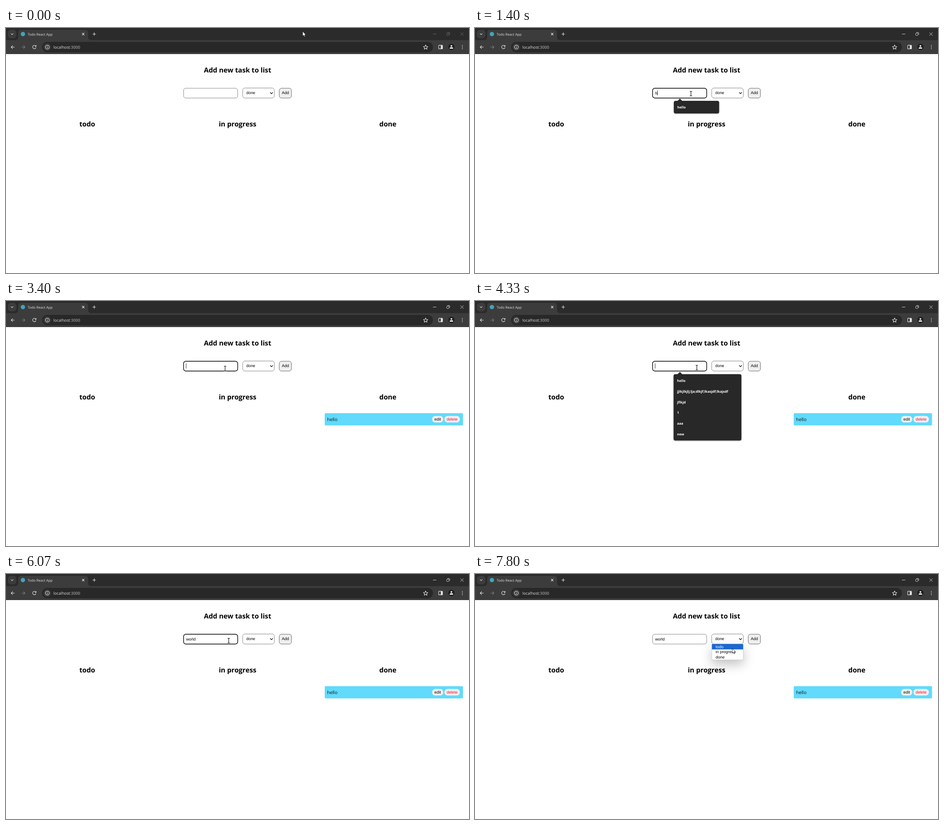
These frames come from a looping animation (1027 by 545 pixels, 8 s). An HTML page:

```html
<!DOCTYPE html>
<html lang="en">
<head>
<meta charset="utf-8">
<title>Todo React App</title>
<style>
  html, body { margin: 0; width: 100%; height: 100%; overflow: hidden; background: #fff; }
  svg { display: block; width: 100%; height: 100%; text-rendering: geometricPrecision; }
  .ui { font-family: "Open Sans", "Noto Sans", sans-serif; }
  .head { font-size: 15.2px; font-weight: 700; text-anchor: middle; }
  .form { font: 8.91px "Liberation Sans", Arial, sans-serif; }
  .mid { text-anchor: middle; }
  .icon { fill: none; stroke: #e3e3e3; stroke-width: 1.1; }
  .field { fill: #fff; stroke: #767676; stroke-width: .9; }
  .field.focus { stroke: #000; stroke-width: 1.4; }
  .winctl { fill: none; stroke: #757575; stroke-width: .8; }
  .winctl.focus { stroke: #f2f2f2; }
  .popup { filter: drop-shadow(0 1px 1.2px rgba(0, 0, 0, .4)); }
  .popup path { fill: #282828; }
  .popup text { fill: #fff; font-size: 7.55px; font-weight: 700; }
  .list { filter: drop-shadow(0 10px 12px rgba(0, 0, 0, .24)); }
</style>
</head>
<body>
<svg viewBox="0 0 1027 545">
  <!-- browser frame -->
  <path fill="#2b2b2b" d="M0 0H1027V30H0Z"/>
  <path fill="#3c3c3c" d="M0 27H20Q27 27 27 20V11Q27 4 34 4H175Q182 4 182 11V20Q182 27 189 27H1027V58H0Z"/>
  <rect x="4" y="4" width="19" height="19" rx="6.5" fill="#3c3c3c"/>
  <path class="icon" d="M11 12.2l2.6 2.6 2.6-2.6"/>
  <circle cx="37.5" cy="13.5" r="4.8" fill="#3fa5bd"/>
  <text class="ui" x="48" y="16.5" font-size="7.65" fill="#e3e3e3">Todo React App</text>
  <path class="icon" d="M168.8 11l5 5m0-5l-5 5M192 13.5h7.4M195.7 9.8v7.4"/>
  <g id="winctl" class="winctl">
    <path d="M947 13.5h7.5M1008 10l7 7m0-7l-7 7"/>
    <rect x="977.5" y="11.5" width="5" height="5" rx="1"/>
    <path d="M979 10h4q1.3 0 1.3 1.3V15"/>
  </g>
  <path class="icon" d="M19 42.5h-7.5m3.6-3.7l-3.7 3.7 3.7 3.7"/>
  <path class="icon" style="stroke:#7c7c7c" d="M34.5 42.5H42m-3.6-3.7l3.7 3.7-3.7 3.7"/>
  <path class="icon" d="M66.2 40.4a3.8 3.8 0 1 0 .3 3.1M66.8 38v3h-3"/>
  <rect x="80" y="31" width="867" height="23" rx="11.5" fill="#282828"/>
  <circle cx="91.7" cy="42.5" r="8.2" fill="#3c3c3c"/>
  <circle class="icon" cx="91.7" cy="42.5" r="4.3"/>
  <path class="icon" d="M91.7 42v2.7M91.7 39.9v1.1"/>
  <text class="ui" x="105" y="45.8" font-size="8.83" fill="#e3e3e3">localhost<tspan fill="#c4c4c4">:3000</tspan></text>
  <path class="icon" stroke-linejoin="round" d="M930.8 37.7l1.4 3.3 3.6.3-2.7 2.4.8 3.5-3.1-1.9-3.1 1.9.8-3.5-2.7-2.4 3.6-.3z"/>
  <rect class="icon" x="959.7" y="38.4" width="8.6" height="8" rx="1"/>
  <path fill="#e3e3e3" d="M964.5 38.4h3.8v8h-3.8z"/>
  <circle cx="988" cy="42" r="7" fill="#202020"/>
  <circle cx="988" cy="39.9" r="1.9" fill="#f1f1f1"/>
  <path fill="#f1f1f1" d="M984.2 46v-.9q0-2.3 3.8-2.3t3.8 2.3v.9z"/>
  <path stroke="#e3e3e3" stroke-width="1.7" stroke-linecap="round" d="M1012.3 38.9v0M1012.3 42.4v0M1012.3 45.9v0"/>

  <!-- page -->
  <g class="ui head">
    <text x="513.6" y="99.3">Add new task to list</text>
    <text x="180.2" y="218.6">todo</text>
    <text x="513.6" y="218.6">in progress</text>
    <text x="847" y="218.6">done</text>
  </g>
  <g class="form">
    <rect id="input" class="field" x="393.9" y="134" width="120" height="21.8" rx="5"/>
    <text id="typed" x="399.4" y="147.6"></text>
    <rect id="caret" y="139" width="1" height="11" fill="#333"/>
    <rect class="field" x="525" y="133.5" width="70.2" height="22.3" rx="5"/>
    <text x="533" y="147.4">done</text>
    <path fill="none" stroke="#000" stroke-width="1.3" d="M586 143.2l2.9 2.9 2.9-2.9"/>
    <rect x="606.1" y="134" width="27.1" height="21.8" rx="5" fill="#efefef" stroke="#555" stroke-width=".9"/>
    <text class="mid" x="619.7" y="147.4">Add</text>
  </g>
  <g id="card" class="form">
    <rect x="707" y="249.5" width="306.7" height="27.3" rx="2.2" fill="#61dafb"/>
    <text class="ui" x="712.2" y="266.8" font-size="10.1" style="font-family:'Open Sans','Noto Sans',sans-serif;font-size:10.1px" fill="#111">hello</text>
    <rect x="945.2" y="255.7" width="24.6" height="14.6" rx="6.7" fill="#efefef"/>
    <text class="mid" x="957.5" y="265.8">edit</text>
    <rect x="972.6" y="255.7" width="34.2" height="14.6" rx="6.7" fill="#efefef"/>
    <text class="mid" x="989.6" y="265.8" fill="#f01030">delete</text>
  </g>

  <!-- overlays -->
  <g id="full" class="ui popup"></g>
  <g id="single" class="ui popup"></g>
  <g id="list" class="form">
    <rect class="list" x="525.4" y="156" width="69.6" height="35" rx="2" fill="#fff" stroke="#bbb" stroke-width=".6"/>
    <rect id="mark" x="525.5" width="69.2" height="11.7" fill="#1967d2"/>
  </g>
  <g id="arrow"><path fill="#fff" stroke="#000" stroke-width=".7" d="M0 0V10.6L2.4 8.4 4.1 12.1 5.8 11.3 4.2 7.8H7.4Z"/></g>
  <g id="beam" fill="none">
    <path id="beamShape" stroke="#fff" stroke-width="2" d="M-2.6-5H-.7L0-4.4.7-5H2.6M0-4.4V4.4M-2.6 5H-.7L0 4.4.7 5H2.6"/>
    <use href="#beamShape"/>
    <path stroke="#000" stroke-width="1.1" d="M-2.6-5H-.7L0-4.4.7-5H2.6M0-4.4V4.4M-2.6 5H-.7L0 4.4.7 5H2.6"/>
  </g>
</svg>
<script>
const $ = id => document.getElementById(id);
const DURATION = 8000, FPS = 15, ROW = 11.7, LIST_TOP = 156;

function add(parent, tag, attrs, text = '') {
  const node = document.createElementNS(parent.namespaceURI, tag);
  for (const key in attrs) node.setAttribute(key, attrs[key]);
  node.textContent = text;
  return parent.appendChild(node);
}

function buildPopup(group, x, y, w, h, items) {
  add(group, 'path', { d: `M${x + 4} ${y}H449.5L454.5 ${y - 5}L459.5 ${y}H${x + w - 4}q4 0 4 4v${h - 8}q0 4-4 4H${x + 4}q-4 0-4-4V${y + 4}q0-4 4-4Z` });
  items.forEach((item, i) => add(group, 'text', { x: x + 7.7, y: y + 17.3 + i * 23.7 }, item));
}
buildPopup($('full'), 440.5, 162.8, 150.4, 147.4,
  ['hello', 'jjlkjlkjlj;lja;dlkjf;lkasjdf;lkajsdf', 'jflkjd', '1', 'aaa', 'new']);
buildPopup($('single'), 441, 162, 100.5, 28, ['hello']);

const rows = ['todo', 'in progress', 'done'].map((label, i) =>
  add($('list'), 'text', { x: 533.8, y: LIST_TOP + 8.6 + i * 11.6 }, label));

// Each step list holds [start in ms, value].
const typing = [[0, ''], [1400, 'h'], [1530, 'he'], [1600, 'hel'], [1800, 'hell'], [2000, 'hello'], [2870, ''],
  [4930, 'w'], [5130, 'wo'], [5270, 'wor'], [5400, 'worl'], [5530, 'world']];
const blink = [[0, 0], [930, 1], [2530, 0], [3070, 1], [3600, 0], [4070, 1], [4600, 0], [4930, 1], [6070, 0]];
const fullFade = [[0, 0], [1000, 1], [1400, 0], [4330, 1], [5000, .71], [5070, .36], [5130, 0]];
const singleFade = [[0, 0], [1400, 1], [2000, .7], [2070, .36], [2130, .12], [2200, 0]];
// Pointer hot spot: [ms, x, y].
const pointer = [[0, 658, 7.5], [670, 479, 146], [2400, 479, 146], [2670, 478.5, 145.5], [3330, 478.5, 145.5],
  [3400, 486, 150], [3870, 492, 148], [6000, 492, 148], [6070, 494, 148], [6600, 572, 143.5],
  [7000, 572, 143.5], [7200, 571.5, 173], [7470, 571.5, 173], [7800, 570.5, 165.5], [8000, 570.5, 165.5]];

const stepAt = (steps, t) => steps.findLast(s => s[0] <= t)[1];

function pointerAt(t) {
  const i = Math.max(1, pointer.findIndex(p => p[0] >= t));
  const [t0, x0, y0] = pointer[i - 1], [t1, x1, y1] = pointer[i];
  const u = (t - t0) / (t1 - t0), k = u * u * (3 - 2 * u);
  return [x0 + (x1 - x0) * k, y0 + (y1 - y0) * k];
}

const inside = (x, y, l, t, r, b) => x > l && x < r && y > t && y < b;
const show = (id, on) => $(id).setAttribute('visibility', on ? 'visible' : 'hidden');

function draw(now) {
  const t = Math.min(DURATION, Math.floor((now % DURATION + 4) * FPS / 1000) * 1000 / FPS + 4);
  const open = t >= 6600;

  $('typed').textContent = stepAt(typing, t);
  $('caret').setAttribute('x', Math.floor(399.4 + $('typed').getComputedTextLength()));
  show('caret', stepAt(blink, t));
  $('input').classList.toggle('focus', t >= 930 && !open);
  $('winctl').classList.toggle('focus', t >= 930);
  $('full').setAttribute('opacity', stepAt(fullFade, t));
  $('single').setAttribute('opacity', stepAt(singleFade, t));
  show('card', t >= 2870);
  show('list', open);

  const [x, y] = pointerAt(t);
  const active = y > LIST_TOP ? Math.floor((y - LIST_TOP) / ROW) : 2;
  $('mark').setAttribute('y', LIST_TOP + active * 11.65);
  rows.forEach((row, i) => row.setAttribute('fill', i === active ? '#fff' : '#000'));

  const overText = inside(x, y, 394, 134, 514, 156) || inside(x, y, 100, 31, 920, 54);
  show('beam', overText);
  show('arrow', !overText);
  $(overText ? 'beam' : 'arrow').setAttribute('transform', `translate(${x} ${y})`);
}

let start;
function loop(now) {
  start ??= now;
  draw(now - start);
  requestAnimationFrame(loop);
}
draw(0);
requestAnimationFrame(loop);
</script>
</body>
</html>
```
